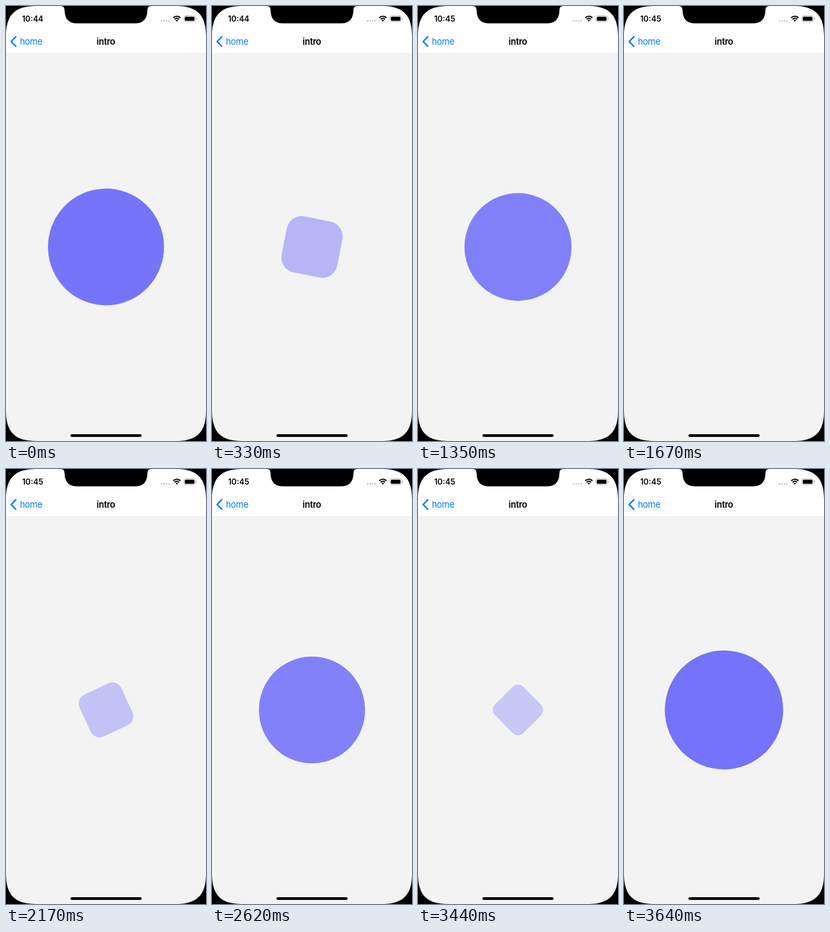
These frames come from a looping animation (296x640 px, 3.73 s). An HTML page:

```html
<!DOCTYPE html>
<html lang="en">
<head>
<meta charset="utf-8">
<title>intro</title>
<style>
  html, body { margin: 0; width: 100%; height: 100%; overflow: hidden; background: #000; }
  svg { display: block; width: 100%; height: 100%; }
  text { font-family: Inter, Roboto, sans-serif; }
  .bold { font-weight: 600; text-anchor: middle; }
</style>
</head>
<body>
<svg viewBox="0 0 296 640">
  <rect width="296" height="640" fill="#f3f3f3"/>
  <rect width="296" height="69" fill="#fff"/>
  <rect id="shape" fill="rgb(16,14,255)"/>

  <!-- status bar -->
  <text id="clock" class="bold" x="39.5" y="23" font-size="11.6">10:44</text>
  <g fill="#bcbcbe">
    <circle cx="230.4" cy="21.9" r="1.1"/>
    <circle cx="234" cy="21.9" r="1.1"/>
    <circle cx="237.6" cy="21.9" r="1.1"/>
    <circle cx="241.2" cy="21.9" r="1.1"/>
  </g>
  <g fill="none" stroke="#000" stroke-width="1.8">
    <path d="M247.4 17.4A7.6 7.6 0 0 1 258.2 17.4"/>
    <path d="M249.5 19.6A4.7 4.7 0 0 1 256.1 19.6"/>
  </g>
  <path d="M252.8 23L250.9 21.1A2.7 2.7 0 0 1 254.7 21.1Z"/>
  <rect x="263.4" y="14.4" width="16.8" height="8.7" rx="2.6" fill="none" stroke="#a6a6a6" stroke-width=".8"/>
  <rect x="264.7" y="15.7" width="14.2" height="6.1" rx="1.5"/>
  <path d="M281.2 17.3q1.2 .4 1.2 1.5t-1.2 1.5z" fill="#a6a6a6"/>

  <!-- navigation bar -->
  <path d="M14.5 45.2L7.6 52.2L14.5 59.2" fill="none" stroke="#007aff" stroke-width="2.2" stroke-linecap="round" stroke-linejoin="round"/>
  <text x="20.4" y="57" font-size="13" letter-spacing="-.25" fill="#007aff">home</text>
  <text class="bold" x="147.8" y="57" font-size="13" letter-spacing="-.25">intro</text>

  <!-- device frame -->
  <path d="M80 0C85 0 86.5 2 86.6 6C86.9 18 92 25.5 105 25.5H191C204 25.5 209.1 18 209.4 6C209.5 2 211 0 216 0Z"/>
  <path id="corner" d="M0 0V44C0 13.3 13.3 0 44 0Z"/>
  <use href="#corner" transform="translate(296 0) scale(-1 1)"/>
  <use href="#corner" transform="translate(0 640) scale(1 -1)"/>
  <use href="#corner" transform="translate(296 640) scale(-1 -1)"/>
  <rect x="95.3" y="630" width="105.5" height="4" rx="2"/>
</svg>
<script>
const LOOP = 3730;
const FULL = 157.8;
const CLOCK_TICK = 1150;

// moments at which the picture refreshes
const ticks = [0, 110, 220, 320, 430, 930, 1050, 1150, 1250, 1350, 1470, 1570,
  1670, 2170, 2280, 2390, 2510, 2620, 2720, 2820, 2920, 3440, 3540, 3640];

// each spring run: start time and target
const runs = [[-380, 1], [215, 0], [831, 1], [1455, 0], [2071, 1], [2705, 0], [3350, 1]];

const shape = document.getElementById('shape');
const clock = document.getElementById('clock');

// underdamped step response
function spring(ms) {
  const w = ms / 100, a = 0.688;
  return 1 - Math.exp(-a * w) * (Math.cos(w) + a * Math.sin(w));
}

function progress(t) {
  const [start, target] = runs.findLast(r => r[0] <= t);
  const x = spring(t - start);
  return target ? x : 1 - x;
}

function setAttrs(el, attrs) {
  for (const key in attrs) el.setAttribute(key, attrs[key]);
}

function draw(t) {
  const p = Math.max(0, progress(t));
  const side = FULL * p;
  setAttrs(shape, {
    x: -side / 2,
    y: -side / 2,
    width: side,
    height: side,
    rx: Math.min(1, p) * side / 2,
    'fill-opacity': p / 2,
    transform: `translate(148 354.5) rotate(${p * 360})`
  });
  clock.textContent = t < CLOCK_TICK ? '10:44' : '10:45';
}

const origin = performance.now();
let shown = -1;

function frame() {
  const t = (performance.now() - origin) % LOOP;
  const tick = ticks.findLast(k => k <= t);
  if (tick !== shown) draw(shown = tick);
  requestAnimationFrame(frame);
}
frame();
</script>
</body>
</html>
```
